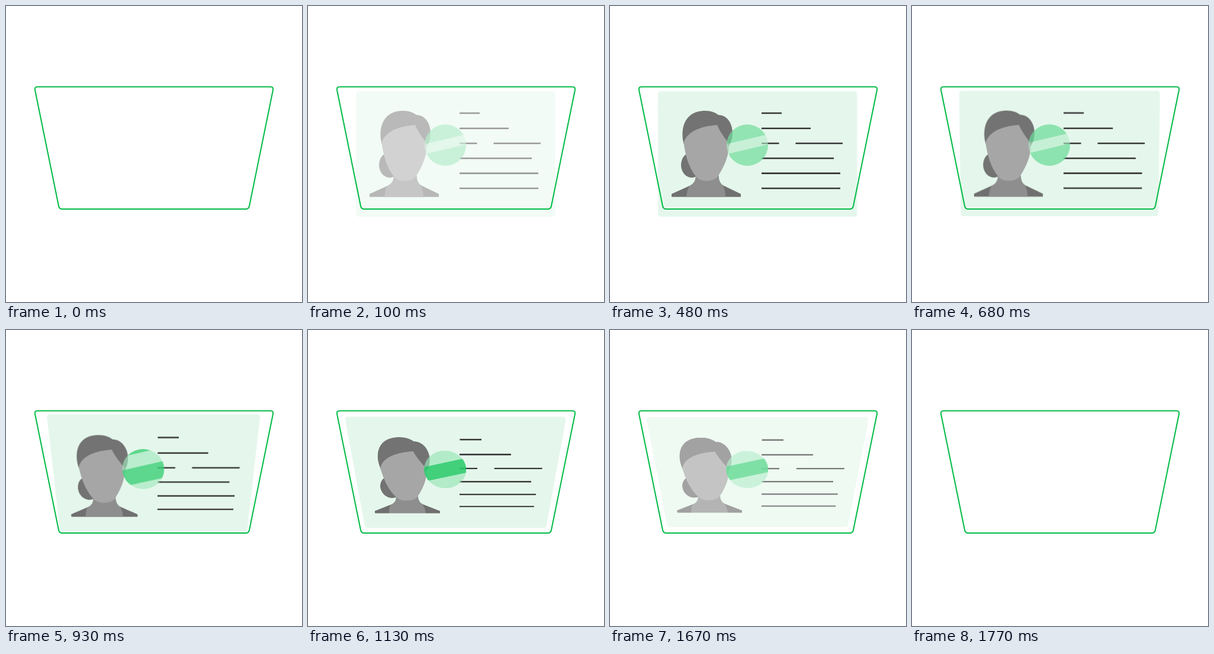
Recreate the animation shown at these times as an HTML page. Size 500x500 px, loop 2.12 s.

```html
<!DOCTYPE html>
<html lang="en">
<head>
<meta charset="utf-8">
<title>Card tilt</title>
<style>
  html, body { margin: 0; width: 100%; height: 100%; overflow: hidden; background: #fff; }
  svg { position: absolute; left: 0; top: 0; width: 500px; height: 500px; }
  #card { transform-origin: 249.5px 250px; }
</style>
</head>
<body>
<svg id="card" viewBox="0 0 500 500">
  <clipPath id="disc"><circle cx="232" cy="235" r="35"/></clipPath>
  <rect x="81" y="144" width="336.5" height="212" rx="5" fill="#e5f7ec"/>

  <ellipse cx="138" cy="268.500" rx="18" ry="21.500" fill="#737373"/>
  <path fill="#707070" d="M104 322.500V317.500L136 303Q145 299 145 288H183.500Q184 299 191 303L221 317.500V322.500Z"/>
  <path fill="#8e8e8e" d="M129 322.500Q130 311 134 304Q145 299 145 286H183.500Q184 299 190 302Q195 311 195 322.500Z"/>
  <path fill="#737373" d="M126 236C119 219 119 177 161 177C171 177 178 180 183 184C198 184 207 199 207 214C207 225 204 232 199 239Z"/>
  <path fill="#a6a6a6" d="M124.500 231C130 213 151 203 181 201C186 213 194 223 200 231C203 251 192 272 183 287C175 298 154 298 146 289C132 272 127 250 124.500 231Z"/>

  <path stroke="#353535" stroke-width="2.6" d="M256 181H290M256 206.700H339M256 232H285.500M313.500 232H393M256 257.300H378M256 282.600H389M256 308H389"/>

  <g clip-path="url(#disc)">
    <path fill="#e5f7ec" fill-opacity=".55" d="M190 190H280V280H190Z"/>
    <path id="tint" fill="#00c14f" d="M190 190H280V280H190Z"/>
    <path id="bands" fill="#00c14f"/>
  </g>
</svg>
<svg viewBox="0 0 500 500">
  <path fill="none" stroke="#00bb45" stroke-width="2" d="M53 136.500H447Q452 136.500 451 142L411 338Q410 343 405 343H95Q90 343 89 338L49 142Q48 136.500 53 136.500Z"/>
</svg>
<script>
const [card, tint, bands] = ['card', 'tint', 'bands'].map(id => document.getElementById(id));
const clamp = (v, max = 1) => Math.min(max, Math.max(0, v));

// Number of 50 ms steps taken since start, at most n
const steps = (t, start, n) => clamp(Math.floor((t - start) / 50) + 1, n);
const ease = p => p < 0.5 ? 4 * p ** 3 : 1 - 4 * (1 - p) ** 3;
const band = (y0, y1) => `M190 ${y0 + 10}L274 ${y0 - 10}V${y1 - 10}L190 ${y1 + 10}Z`;

function draw(now) {
  const t = now % 2120;
  const e = ease(clamp((steps(t, 480, 18) - 0.4) / 17.6));
  card.style.opacity = steps(t, 50, 4) / 4 - steps(t, 1670, 3) / 3;
  card.style.transform = `perspective(500px) rotateX(${-30 * e}deg)`;
  tint.style.opacity = 0.13 + 0.1 * e;
  bands.style.opacity = 0.264 + 0.38 * e;
  bands.setAttribute('d', band(160, 225 - 32 * e) + band(242 - 22 * e, 275 - 28 * e));
}

const begin = performance.now();
function loop() {
  draw(performance.now() - begin);
  requestAnimationFrame(loop);
}
loop();
</script>
</body>
</html>
```
